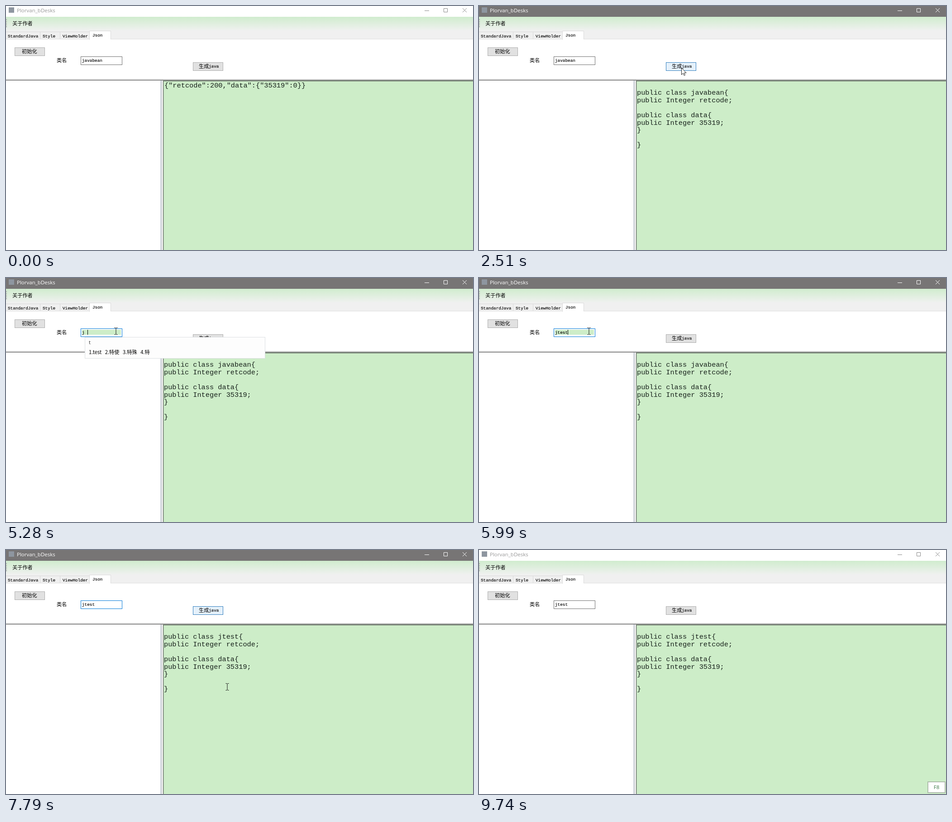
Animation, 1032 px wide and 542 px high, one loop 9.83 s. Source, as an HTML page:

```html
<!DOCTYPE html>
<html lang="zh">
<head>
<meta charset="utf-8">
<title>Plorvan_bDesks</title>
<style>
  html, body { margin: 0; width: 100%; height: 100%; overflow: hidden; background: #fff; }
  svg { display: block; width: 1032px; height: 542px; }
  text { white-space: pre; }
  .ui { font: 9.35px "Liberation Mono", "Noto Sans CJK SC", "Noto Sans CJK", monospace; fill: #000; stroke: #000; stroke-width: .15px; }
  .zh { font: 11.2px "Noto Sans CJK SC", "Noto Sans CJK", sans-serif; fill: #000; }
  .code { font: 15.3px "Liberation Mono", monospace; fill: #16201a; }
  .sans { font: 11.5px "Open Sans", "Noto Sans", sans-serif; }
  .ctl { fill: #e1e1e1; stroke: #adadad; }
  .tab { fill: #f0f0f0; stroke: #d9d9d9; }
  #bar { fill: #fff; }
  #name { fill: #999; }
  #sys { fill: none; stroke: #888; }
  .active #bar { fill: #777575; }
  .active #name { fill: #fff; }
  .active #sys { stroke: #fff; }
  #gen.hover { fill: #e5f1fb; stroke: #2f7dbd; }
  #gen.press { fill: #cce4f7; stroke: #1f5e94; }
  #box { fill: #fff; stroke: #6e6e6e; }
  #box.focus { stroke: #0078d7; }
</style>
</head>
<body>
<svg id="app" viewBox="0 0 1032 542">
  <defs>
    <linearGradient id="menu" x2="0" y2="1">
      <stop offset="0" stop-color="#d0ecce"/>
      <stop offset="1" stop-color="#f0f1f0"/>
    </linearGradient>
  </defs>
  <rect width="1032" height="542" fill="#fff"/>

  <rect id="bar" width="1032" height="24"/>
  <rect x="6" y="3" width="12" height="12" fill="#8e96a0"/>
  <text id="name" class="sans" x="24" y="14">Plorvan_bDesks</text>
  <path id="sys" d="M925 10.5h10M967.5 5.5h8v8h-8zM1009 5l9 9M1018 5l-9 9"/>

  <rect y="24" width="1032" height="31" fill="url(#menu)"/>
  <path d="M1 29v19" stroke="#a5aaa5" stroke-width="2" stroke-dasharray="2 2"/>
  <text class="zh" x="14" y="43">关于作者</text>

  <rect y="54" width="1032" height="20" fill="#f0f0f0"/>
  <path class="tab" d="M-.5 57.5h76v16h-76zM75.5 57.5h44v16h-44zM119.5 57.5h65v16h-65z"/>
  <path d="M0 73.5h1032" stroke="#dcdcdc"/>
  <path d="M184.5 75V55.5h47V74" fill="#fff" stroke="#d9d9d9"/>
  <path d="M185 74h46" stroke="#fff" stroke-width="2"/>
  <g class="ui">
    <text x="4" y="69.5">StandardJava</text>
    <text x="81" y="69.5">Style</text>
    <text x="125" y="69.5">ViewHolder</text>
    <text x="191" y="68">Json</text>
  </g>

  <rect class="ctl" x="19.5" y="92.5" width="66" height="18"/>
  <text class="zh" x="35" y="105">初始化</text>
  <text class="zh" x="112" y="125">类名</text>

  <rect id="box" x="165.5" y="112.5" width="91" height="18"/>
  <rect id="fill" x="168" y="115" width="86" height="11" fill="#cdedc8"/>
  <text id="word" class="ui" x="168" y="124"></text>
  <rect id="caret" y="115" width="1" height="11"/>

  <rect id="gen" class="ctl" x="413.5" y="125.5" width="66" height="18"/>
  <text class="zh" x="426" y="137.5">生成</text>
  <text class="ui" x="448" y="137">java</text>

  <rect y="162" width="1032" height="2" fill="#e2e2e2"/>
  <rect x="343" y="164" width="4" height="378" fill="#f0f0f0"/>
  <rect x="347" y="165" width="685" height="377" fill="#cdedc8"/>
  <path d="M0 164.7h1032" stroke="#747474" stroke-width="1.5"/>
  <path d="M1032 166.5H347.7V542" fill="none" stroke="#5f655f" stroke-width="1.3"/>
  <path d="M342.5 165v377" stroke="#8590a5"/>
  <g id="code" class="code"></g>

  <g id="ime">
    <rect x="174.5" y="131.5" width="398" height="47" fill="#fdfdfd" stroke="#dcdfe2"/>
    <text id="typed" class="sans" x="183" y="147" fill="#333"></text>
    <text class="zh" x="183" y="169">1.test   2.特使   3.特殊   4.特</text>
  </g>

  <g id="badge">
    <rect x="991" y="514" width="40" height="26" fill="#9aaa98" opacity=".7"/>
    <rect x="992.5" y="515.5" width="37" height="23" fill="#fff" stroke="#b5bdb4"/>
    <text class="sans" x="1011" y="531" text-anchor="middle" fill="#3f7a4a">F8</text>
  </g>

  <path id="arrow" d="M.5 .5V15.7L4 12.4 6.3 17.4 8.5 16.4 6.3 11.6H11z" fill="#fff" stroke="#222"/>
  <path id="beam" d="M-3.5 -7.5H-1L0 -6.5 1 -7.5H3.5M0 -6.5V6.5M-3.5 7.5H-1L0 6.5 1 7.5H3.5" fill="none" stroke="#111"/>
</svg>
<script>
const LOOP = 9830;
const el = id => document.getElementById(id);
const show = (id, on) => { el(id).style.display = on ? "" : "none"; };
const at = (track, t) => track.findLast(k => k[0] <= t)[1];

// Spreads n held positions over a polyline between two times.
function move(from, to, n, ...pts) {
  return Array.from({ length: n }, (_, i) => {
    const u = n > 1 ? i / (n - 1) : 0, p = u * (pts.length - 1);
    const k = Math.floor(p), f = p - k, a = pts[k], b = pts[k + 1] || a;
    const mix = j => Math.round(a[j] + (b[j] - a[j]) * f);
    return [Math.floor(from + (to - from) * u), [mix(0), mix(1)]];
  });
}

const away = [-50, -50];
const pointer = [
  [0, away],
  ...move(340, 800, 7, [792, 491], [693, 398], [617, 370], [617, 339], [590, 300], [557, 245], [562, 257]),
  ...move(950, 1420, 7, [557, 245], [451, 133]),
  ...move(1820, 1970, 3, [475, 147], [500, 160], [523, 166]),
  [2120, [447, 137]],
  ...move(2580, 3360, 11, [432, 135], [330, 121], [262, 118], [243, 118]),
  ...move(6470, 7020, 8, [252, 116], [330, 105], [430, 125], [453, 138]),
  ...move(7560, 7790, 4, [460, 165], [489, 304]),
  ...move(8030, 8580, 8, [453, 279], [395, 238], [470, 210], [640, 140], [805, 84]),
  ...move(8750, 8820, 2, [850, 90], [877, 104]),
  ...move(8900, 9060, 3, [891, 234], [640, 420], [363, 527]),
  [9140, away]
];
const words = [
  [0, "javabean"], [4200, "javabe"], [4360, "javab"], [4500, "java"],
  [4580, "jav"], [4730, "ja"], [4810, "j"], [5990, "jtest"]
];
const button = [
  [0, ""], [1420, "hover"], [2120, "press"], [2270, "hover"], [2660, ""],
  [6940, "hover"], [7170, "press"], [7410, "hover"], [8030, ""]
];
const typing = [[0, ""], [5280, "t"], [5360, "te"], [5430, "test"], [5990, ""]];
const bean = name => [
  `public class ${name}{`, "public Integer retcode;", "",
  "public class data{", "public Integer 35319;", "}", "", "}"
];
const output = [
  [0, ['{"retcode":200,"data":{"35319":0}}']],
  [2270, ["", ...bean("javabean")]],
  [7330, ["", ...bean("jtest")]]
];

let shown;
function writeCode(lines) {
  if (lines === shown) return;
  shown = lines;
  el("code").replaceChildren(...lines.map((line, i) => {
    const row = document.createElementNS("http://www.w3.org/2000/svg", "text");
    row.setAttribute("x", lines.length > 1 ? 349 : 350);
    row.setAttribute("y", 180.8 + i * 16.55);
    row.textContent = line;
    return row;
  }));
}

function render(t) {
  el("app").classList.toggle("active", t >= 260 && t < 9630);

  const word = at(words, t), typed = at(typing, t);
  el("word").textContent = word;
  el("box").classList.toggle("focus", t >= 3280 && t < 8110);
  show("fill", t >= 3280 && t < 7170);
  show("caret", t >= 3360 && t < 6470 && !(t >= 5670 && t < 5990));
  el("caret").setAttribute("x", Math.round(168 + 5.61 * word.length + (typed ? 6 : 0)));
  show("ime", typed);
  el("typed").textContent = typed;

  el("gen").setAttribute("class", "ctl " + at(button, t));
  writeCode(at(output, t));

  const [x, y] = at(pointer, t);
  const inText = (x > 347 && y > 166) || (x > 165 && x < 257 && y > 112 && y < 131);
  show("beam", inText);
  show("arrow", !inText);
  el(inText ? "beam" : "arrow").setAttribute("transform", `translate(${x} ${y})`);

  el("badge").setAttribute("opacity", Math.max(0, Math.min(1, (t - 9580) / 150)));
}

const start = performance.now();
function tick() {
  render((performance.now() - start) % LOOP);
  requestAnimationFrame(tick);
}
tick();
</script>
</body>
</html>
```
